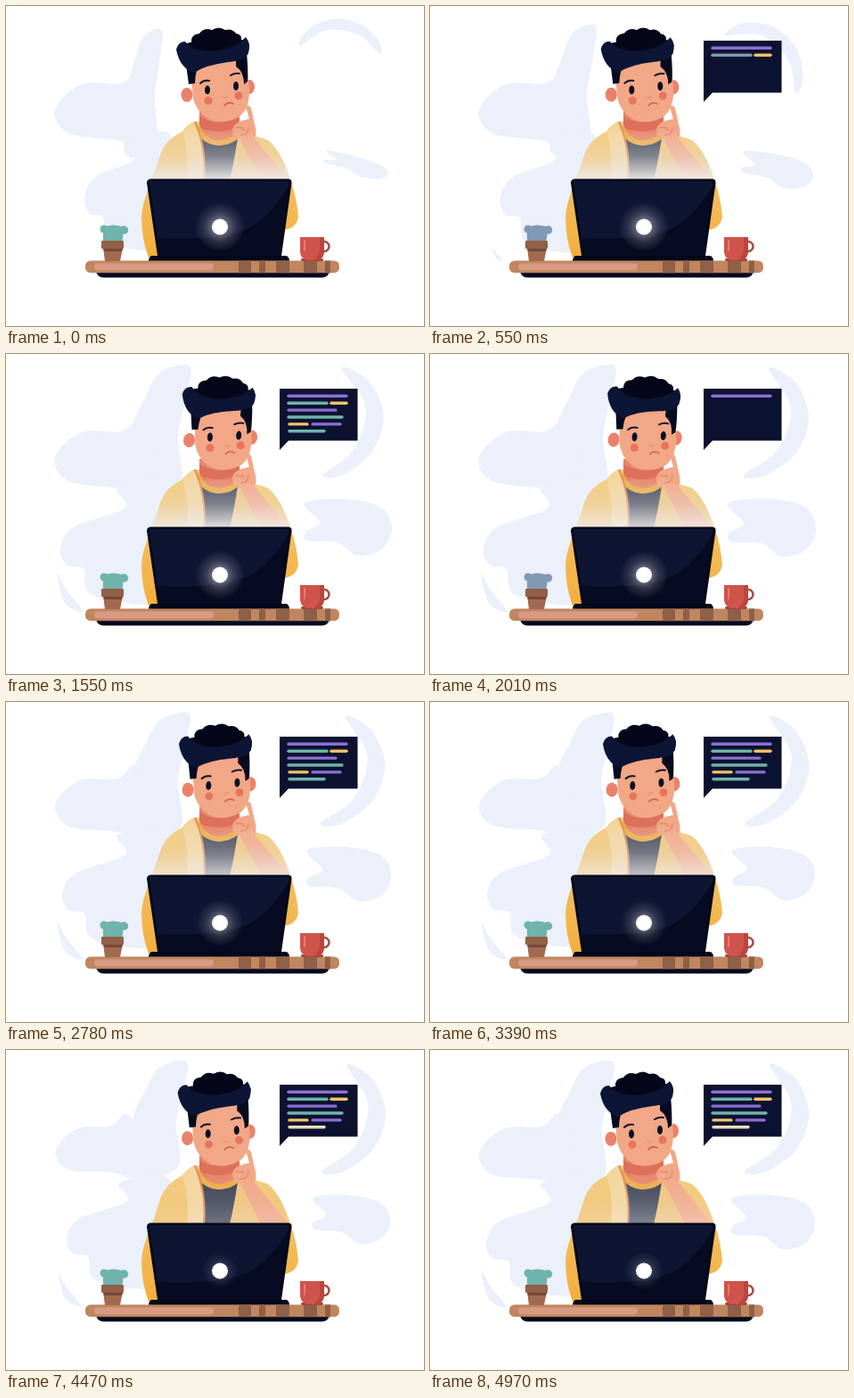
Write an HTML page that moves like this. It is 469 px wide and 360 px high and loops after 5100 ms.

```html
<!DOCTYPE html>
<html lang="en">
<head>
<meta charset="utf-8">
<title>Thinking at the laptop</title>
<style>
html, body { margin: 0; width: 100%; height: 100%; overflow: hidden; background: #fff; }
svg { display: block; width: 100%; height: 100%; }
</style>
</head>
<body>
<svg viewBox="0 0 469 360">
  <defs>
    <radialGradient id="glow">
      <stop offset=".3" stop-color="#e6e2e4" stop-opacity=".42"/>
      <stop offset=".6" stop-color="#d8d4d8" stop-opacity=".18"/>
      <stop offset="1" stop-color="#d8d4d8" stop-opacity="0"/>
    </radialGradient>
    <linearGradient id="fade" x1="0" y1="0" x2="0" y2="1">
      <stop offset="0" stop-color="#ebe6e4" stop-opacity=".1"/>
      <stop offset=".5" stop-color="#ebe6e4" stop-opacity=".4"/>
      <stop offset="1" stop-color="#f1eeec" stop-opacity=".95"/>
    </linearGradient>
    <linearGradient id="coat" x1="0" y1="0" x2="0" y2="1">
      <stop offset="0" stop-color="#f3cd80"/>
      <stop offset="1" stop-color="#f2ae3c"/>
    </linearGradient>
    <clipPath id="bodyClip"><use href="#bodyShape"/></clipPath>
    <clipPath id="tableClip"><rect x="89" y="286.500" width="285" height="13.800" rx="6"/></clipPath>
  </defs>

  <g id="blobs" fill="#ebf0fa"></g>

  <!-- body -->
  <path id="bodyShape" fill="url(#coat)" d="M211 130Q203 134 198 141Q180 150 174 165L164 196Q153 220 152 236Q152 262 160 283H305L312 252Q326 250 328 237Q326 214 319 195Q308 162 294 151Q282 146 268 145L262 130Z"/>
  <path fill="#e7866b" d="M217 118H262V147Q240 160 217 142Z"/>
  <path fill="#dc705b" d="M217 124Q238 137 262 125V136Q238 145 217 137Z"/>
  <path fill="#3c4357" d="M215 144Q236 166 260 149L252 196H223Z"/>
  <path fill="none" stroke="#ecab48" stroke-width="6" d="M215 136Q220 152 238 154Q256 153 262 142"/>
  <path fill="#f4d69c" d="M211 130L198 141Q206 166 203 196H222Q224 158 211 130Z"/>
  <path fill="none" stroke="#df9058" stroke-width="2.2" d="M212 130Q225 160 222 196"/>
  <path fill="#efc47a" d="M262 147L278 150 300 196H251Z"/>

  <!-- head -->
  <g id="head">
    <ellipse cx="203" cy="100" rx="6.500" ry="8" fill="#ea826b"/>
    <ellipse cx="273" cy="91" rx="6" ry="8" fill="#ea826b"/>
    <path fill="#f2a786" d="M207 72L268 58Q272 76 273 95Q273 116 262 124Q248 133 231 129Q215 122 210 104Z"/>
    <path fill="#060a20" d="M202 66L214 72Q212 80 212 87L205 88ZM258 60L270 52Q272 74 271 85L267 88Q267 74 258 68Z"/>
    <path fill="#040719" d="M196 56Q197 41 208 41Q207 32 217 31Q222 24 231 27Q239 22 246 27Q254 25 258 31Q265 32 264 38Q273 38 273 45L267 58 212 68Z"/>
    <path fill="#0d1535" d="M191 49Q193 40 201 40Q210 51 232 51Q256 49 269 35Q275 42 272 53Q268 61 250 63Q225 66 211 75Q195 70 191 49Z"/>
    <path fill="none" stroke="#10132c" stroke-width="2" stroke-linecap="round" d="M218 87Q222 83 228 84M252 78Q257 75 262 76"/>
    <ellipse cx="226" cy="94.500" rx="3" ry="5" fill="#0b0f26"/>
    <ellipse cx="258" cy="90" rx="3" ry="5" fill="#0b0f26"/>
    <circle cx="227" cy="106.500" r="4.500" fill="#e8745f"/>
    <circle cx="261" cy="101" r="4.500" fill="#e8745f"/>
    <path fill="none" stroke="#eb9674" stroke-width="2" stroke-linecap="round" d="M244 102Q246 104 248 102"/>
    <path fill="none" stroke="#cf5f4f" stroke-width="1.500" stroke-linecap="round" d="M245 112Q249 107 255 110"/>
  </g>

  <!-- hand and forearm -->
  <path fill="#f2a786" d="M269 113Q273 110 275 115L279 133Q282 143 279 149L315 193V196H286L263 151Q253 148 254 138Q257 131 265 129L273 127Z"/>
  <path fill="none" stroke="#e08468" stroke-width="1.300" stroke-linecap="round" d="M258 137Q264 135 267 139M263 145Q271 146 272 137"/>
  <rect id="haze" x="150" y="142" width="180" height="54" fill="url(#fade)" clip-path="url(#bodyClip)"/>

  <!-- laptop -->
  <path fill="#040819" d="M162 194.500H317Q321 195 320.500 199L309 281H315Q318 283 318 287H160Q160 283 163 281H170L158 199Q158 195 162 194.500Z"/>
  <path fill="#070b22" d="M162 197H316Q318 197 317.500 200L306 281H173L161 200Q160 197 162 197Z"/>
  <path fill="#0e1533" d="M162 197H316Q318 197 317 203Q290 246 262 254Q230 264 170 261L161 200Q160 197 162 197Z"/>
  <circle id="halo" cx="240" cy="248.500" r="28" fill="url(#glow)"/>
  <circle cx="240" cy="248.500" r="9" fill="#fff"/>

  <!-- table -->
  <path fill="#050a20" d="M101 299H363Q361 305 355 305.500H109Q103 305 101 299Z"/>
  <g clip-path="url(#tableClip)">
    <path fill="#c0865f" d="M89 286H374V301H89Z"/>
    <path fill="#8e6048" d="M261 286H275V301H261ZM284 286H291V301H284ZM303 286H318V301H303ZM334 286H349V301H334ZM358 286H364V301H358Z"/>
    <rect x="99" y="289.500" width="134" height="8" rx="4" fill="#d89a82"/>
  </g>

  <!-- plant -->
  <g id="plant">
    <path d="M109 265Q108 250 112 248Q120 245 130 248Q133 256 130 265Z"/>
    <circle cx="110" cy="251" r="4.500"/>
    <circle cx="132.500" cy="252" r="4.700"/>
  </g>
  <path fill="#a2694f" d="M109 272H131L128 287H111Z"/>
  <rect x="107" y="264" width="25" height="9" rx="1" fill="#925f48"/>
  <path fill="#74483a" d="M109 273H131L130 276H110Z"/>

  <!-- cup -->
  <circle cx="357" cy="270.500" r="5.500" fill="none" stroke="#a84a42" stroke-width="2.500"/>
  <rect x="331" y="284" width="25" height="3" rx="1.500" fill="#a8423c"/>
  <path fill="#cf544b" d="M330 260H357V277Q356 285 348 286H339Q331 285 330 277Z"/>
  <path fill="#b9473f" d="M352 260H357V277Q356 285 348 286H345Q352 281 352 273Z"/>
  <path fill="none" stroke="#e27d72" stroke-width="2" stroke-linecap="round" d="M335 264V275"/>

  <!-- speech bubble -->
  <g id="bubble">
    <path fill="#0c1230" d="M307 39H394.500V97.500H317L307 108Z"/>
    <g id="rows" stroke-width="3.400" stroke-linecap="round"></g>
  </g>
</svg>
<script>
const LOOP = 5100, CYCLE = 1700, SHOW = 230, TURN = 2010;
const PURPLE = '#8d6fd6', TEAL = '#6fb3ab', GOLD = '#f2c468', GREY = '#8199b4', CREAM = '#e9dcc0';
const $ = id => document.getElementById(id);
const mix = (a, b, k) => a + (b - a) * k;

function make(tag, parent, attrs) {
  const el = document.createElementNS('http://www.w3.org/2000/svg', tag);
  set(el, attrs);
  return parent.appendChild(el);
}

function set(el, attrs) {
  for (const name in attrs) el.setAttribute(name, attrs[name]);
}

// Eased 0 to 1 between two times
function ramp(t, from, to) {
  const x = Math.max(0, Math.min(1, (t - from) / (to - from)));
  return x * x * (3 - 2 * x);
}

// Closed smooth curve through "x,y" points
function curve(text) {
  const pts = text.split(' ').map(p => p.split(',').map(Number));
  const n = pts.length, at = i => pts[(i + n) % n];
  const bend = (a, b, c) => [0, 1].map(j => a[j] + (c[j] - b[j]) / 6);
  return pts.reduce((d, p, i) => {
    const next = at(i + 1);
    return d + `C${bend(p, at(i - 1), next)} ${bend(next, at(i + 2), p)} ${next}`;
  }, 'M' + pts[0]) + 'Z';
}

// Placement of a blob: anchor x, y, scale x, y, turn
const place = (x, y, sx = 1, sy = 1, turn = 0) => [x, y, sx, sy, turn];

// Each blob grows from its opening placement, later shrinks to the thin one
const blobs = [
  { full: place(174, 13), open: place(155, 27, 0.6, 0.95), thin: place(168, 15, 0.55, 0.36),
    points: '207,13 174,20 157,48 140,90 140,160 196,150 194,92 204,45' },
  { full: place(55, 116), open: place(55, 116), thin: place(58, 104, 0.32, 0.12, -20),
    points: '150,72 130,87 85,88 55,116 70,143 125,151 160,160 165,100' },
  { full: place(188, 150), open: place(188, 150, 0.78, 0.95), thin: place(178, 146, 0.62, 0.55),
    points: '125,150 133,173 75,195 60,220 68,238 86,242 94,270 150,282 180,270 188,150' },
  { full: place(72, 272), open: place(78, 284, 0.05, 0.05), thin: place(71, 277, 0.35, 0.25),
    points: '57,246 67,264 87,290 66,280' },
  { full: place(390, 76), open: place(373, 35, 0.6, 0.74, -95), thin: place(398, 79, 0.88, 0.98),
    points: '380,16 410,32 425,72 410,112 375,137 352,136 390,108 405,60' },
  { full: place(385, 195), open: place(394, 180, 0.74, 0.32, 14), thin: place(402, 172, 0.46, 0.2, 10),
    points: '334,168 380,163 420,172 433,196 422,220 395,228 372,213 338,211 336,201 352,190' }
];
for (const b of blobs) b.path = make('path', $('blobs'), { d: curve(b.points) });

// Typed rows: start, length and colour of each dash
const rows = [
  [[317, 65, PURPLE]],
  [[317, 43, TEAL], [365, 17, GOLD]],
  [[317, 53, PURPLE]],
  [[317, 60, TEAL]],
  [[318, 20, GOLD], [344, 31, PURPLE]],
  [[318, 39, TEAL]]
].map((dashes, i) => dashes.map(([x, len, color]) => {
  const y = 47.3 + 7.9 * i;
  return { x, len, color, line: make('line', $('rows'), { x1: x, y1: y, y2: y }) };
}));

function drawBlobs(t) {
  const dip = Math.exp(-(((t - 4010) / 330) ** 2));
  const grown = t < TURN
    ? 0.92 * ramp(t, SHOW, 1010) + 0.08 * ramp(t, 1010, TURN)
    : (1 - 0.08 * ramp(t, TURN, 2780)) * (1 - dip);
  for (const { path, full, open, thin } of blobs) {
    const from = t < TURN ? open : thin;
    const [x, y, sx, sy, turn] = full.map((v, i) => mix(from[i], v, grown));
    set(path, {
      transform: `translate(${x} ${y}) rotate(${turn}) scale(${sx} ${sy}) translate(${-full[0]} ${-full[1]})`
    });
  }
}

function drawBubble(t) {
  const phase = t % CYCLE;
  const teal = phase >= SHOW && phase < 640 ? GREY : TEAL;
  set($('plant'), { fill: teal });
  set($('bubble'), { display: phase < SHOW ? 'none' : 'inline' });
  rows.forEach((dashes, i) => {
    const done = 310 + 150 * i;
    const part = ramp(phase, done - 50, done);
    const green = i === 5 && t > 2 * CYCLE ? CREAM : teal;
    for (const { x, len, color, line } of dashes) {
      set(line, {
        x2: x + len * part,
        stroke: color === TEAL ? green : color,
        display: part ? 'inline' : 'none'
      });
    }
  });
}

function draw(t) {
  drawBlobs(t);
  drawBubble(t);
  const tilt = 5.6 * ramp(t, SHOW, TURN) - 3.5 * ramp(t, TURN, 2780) - 2.1 * ramp(t, 4010, 4970);
  const light = 1 - 0.2 * ramp(t, 1010, 3390) - 0.6 * ramp(t, 3390, 4010) + 0.2 * ramp(t, 4010, 4970);
  set($('head'), { transform: `rotate(${tilt} 240 130)` });
  set($('haze'), { opacity: light });
  set($('halo'), { r: 17 + 11 * light, opacity: 0.3 + 0.7 * light });
}

const start = performance.now();
function tick(now) {
  draw(Math.max(0, now - start) % LOOP);
  requestAnimationFrame(tick);
}
draw(0);
requestAnimationFrame(tick);
</script>
</body>
</html>
```
